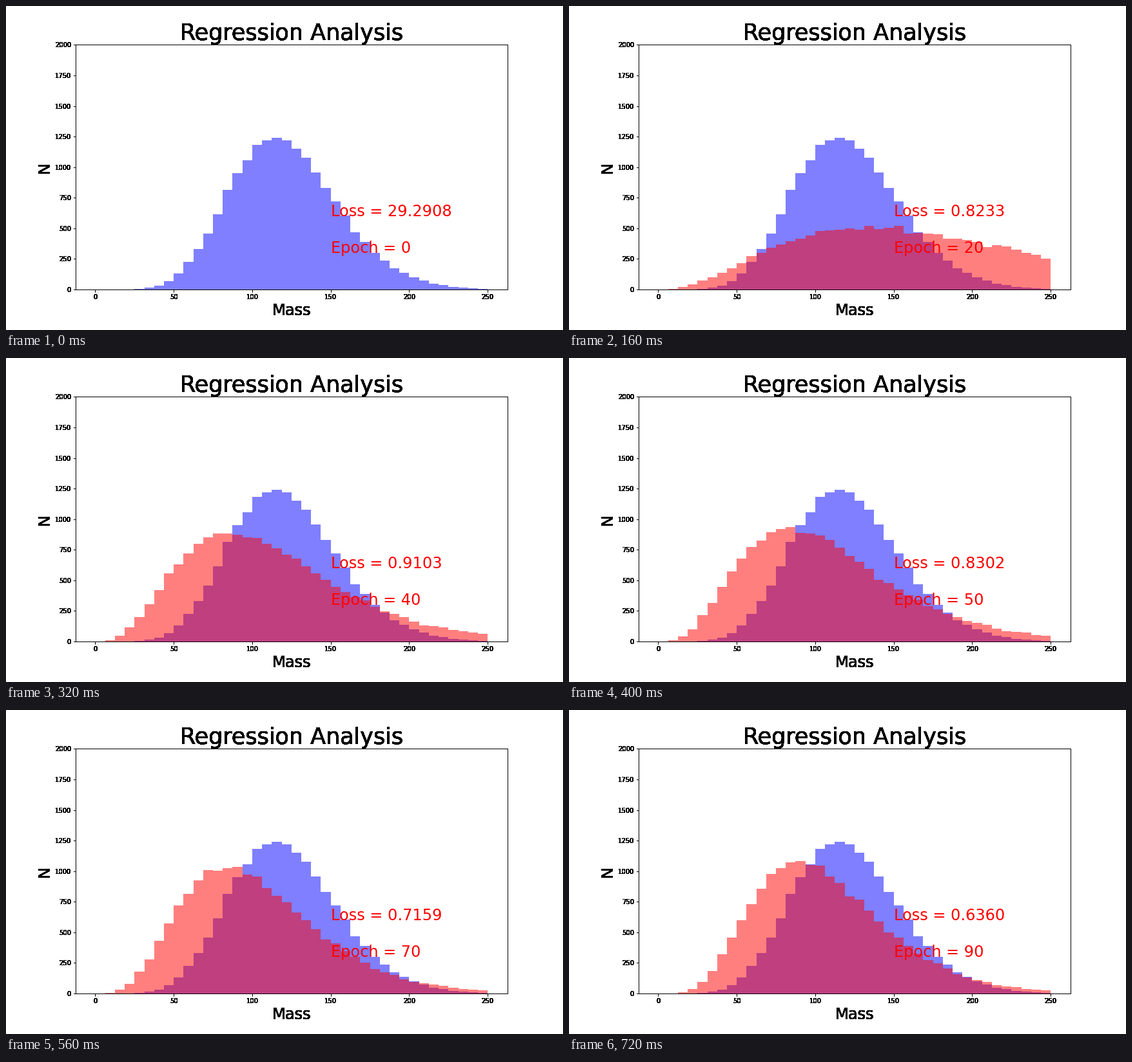
These frames come from a looping animation (864x504 px, 800 ms). A matplotlib script:

```python
import numpy as np
import matplotlib.pyplot as plt
from matplotlib.animation import FuncAnimation

BINS, WIDTH = 40, 6.25
LAYERS = 24  # stacked axes give the text its hard, heavy edges

plt.rcParams["font.family"] = "DejaVu Sans"

# How training goes: loss and shape of the fit, linear between the keys
KEYS = [10, 20, 40, 60, 80, 90]
LOSS = [3.0443, 0.8233, 0.9103, 0.7501, 0.6818, 0.6360]
PEAK = [1090, 508, 890, 985, 1080, 1075]
MODE = [67, 133, 86, 83, 84, 90]
POWER = [3.1, 2.6, 3.3, 3.8, 4.7, 5.1]
FIRST_LOSS = 29.2908

edges = np.arange(BINS) * WIDTH
centers = edges + WIDTH / 2


def counts(peak, mode, power, start=0, seed=0):
    """Gamma-shaped histogram from start, with slight counting noise."""
    u = (centers - start) / (mode - start)
    n = peak * (u * np.exp(1 - u)) ** power
    noise = np.random.default_rng(seed).normal(0, 0.5, BINS)
    return np.maximum(np.round(n + noise * np.sqrt(n)), 0)


def at(epoch, values):
    return np.interp(epoch, KEYS, values)


def fit(epoch):
    """Loss and histogram at an epoch; the first fit lies out of range."""
    if epoch == 0:
        return FIRST_LOSS, np.zeros(BINS)
    shape = [at(epoch, values) for values in (PEAK, MODE, POWER)]
    return at(epoch, LOSS), counts(*shape, seed=epoch)


def make_axes(fig):
    ax = fig.add_subplot(111, facecolor="none")
    ax.set_xlim(-12.5, 262.5)
    ax.set_ylim(0, 2000)
    ax.set_title("Regression Analysis", fontsize=35)
    ax.set_xlabel("Mass", fontsize=24)
    ax.set_ylabel("N", fontsize=24)
    ax.spines[:].set_visible(False)
    return ax


fig = plt.figure(figsize=(12, 7), dpi=72, facecolor="white")
fig.subplots_adjust(left=0.125, right=0.9, bottom=0.125, top=0.88)
ax = [make_axes(fig) for _ in range(LAYERS)][0]
ax.spines[:].set(visible=True, linewidth=1)

style = dict(width=WIDTH, align="edge", alpha=0.5, linewidth=0)
truth = counts(1255, 114.5, 21, start=-40, seed=5)
ax.bar(edges, truth, color="blue", **style)
fit_bars = ax.bar(edges, np.zeros(BINS), color="red", **style)
loss_text = ax.text(150, 600, "", color="red", fontsize=24)
epoch_text = ax.text(150, 300, "", color="red", fontsize=24)


def update(frame):
    epoch = 10 * frame
    loss, heights = fit(epoch)
    for bar, n in zip(fit_bars, heights):
        bar.set_height(n)
        bar.set_visible(n > 0)
    loss_text.set_text(f"Loss = {loss:.4f}")
    epoch_text.set_text(f"Epoch = {epoch}")
    return [*fit_bars, loss_text, epoch_text]


anim = FuncAnimation(fig, update, frames=10, interval=80, repeat=True,
                     repeat_delay=0, blit=False)
plt.show()
```
